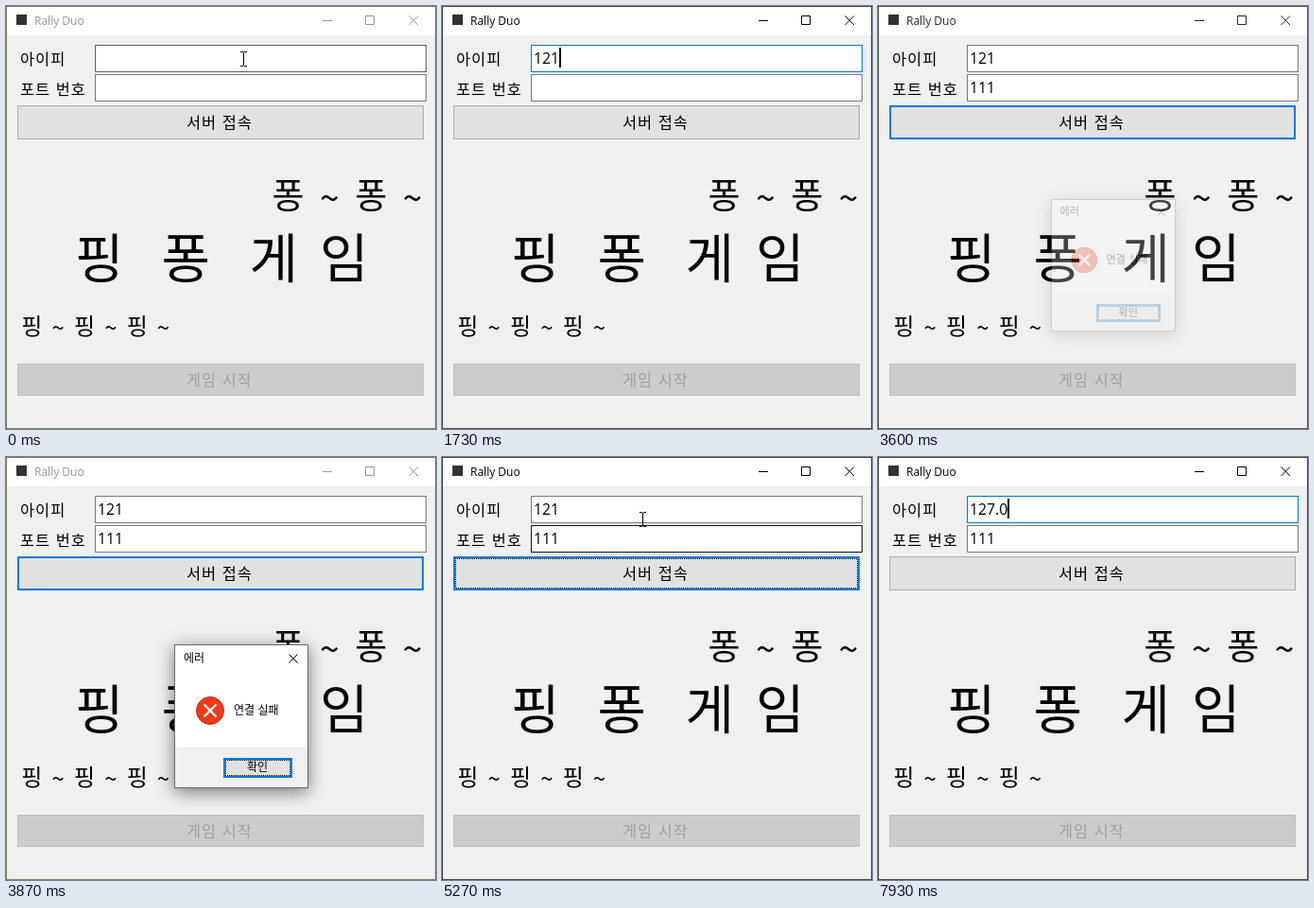
An HTML page that plays this animation: 455 px wide and 447 px high, repeating every 8 s.

```html
<!DOCTYPE html>
<html lang="ko">
<head>
<meta charset="utf-8">
<style>
html, body { margin: 0; width: 100%; height: 100%; overflow: hidden; background: #f0f0f0 }
svg { display: block }
text { font-family: "Noto Sans CJK KR", "Noto Sans CJK", sans-serif; font-weight: 350; white-space: pre }
tspan { baseline-shift: -.08em }
rect { shape-rendering: crispEdges }
.latin { font-family: "Open Sans", "Noto Sans", sans-serif; font-weight: 400 }
.label { font-size: 16.4px; letter-spacing: 1px }
.input { font-size: 15.8px }
.small { font-size: 12px }
.box { fill: #fff }
.blue { fill: none; stroke: #0078d7; stroke-width: 2 }
.dots { fill: none; stroke: #000; stroke-dasharray: 1; stroke-dashoffset: .5 }
.line { fill: none; stroke: #000 }
#dialog { transform-origin: 249px 274px; filter: drop-shadow(0 4px 9px rgba(0, 0, 0, .5)) }
</style>
</head>
<body>
<svg width="455" height="447" viewBox="0 0 455 447">
  <rect width="455" height="447" fill="#f0f0f0"/>
  <rect width="455" height="31" fill="#fff"/>
  <rect id="frame" x=".5" y=".5" width="454" height="446" fill="none"/>
  <rect x="11" y="9" width="11" height="11" fill="#333"/>
  <text id="title" class="latin small" x="30" y="20">Rally Duo</text>
  <path id="controls" class="line" d="M335 15.5h10M380.5 10.5h9v9h-9zM426.5 10.5l9.5 9.5M436 10.5l-9.5 9.5"/>

  <text class="label" x="15" y="62">아이피</text>
  <text class="label" x="15" y="94">포트 번호</text>
  <rect id="ipBox" class="box" x="94.5" y="41.5" width="350" height="28"/>
  <rect id="portBox" class="box" x="94.5" y="72.5" width="350" height="28"/>
  <text id="ip" class="latin input" x="97" y="61"></text>
  <text id="port" class="latin input" x="97" y="92"></text>
  <rect id="caret" height="21"/>

  <rect id="button" x="12.5" y="105.5" width="429" height="35" stroke="#adadad"/>
  <rect id="focus" class="blue" x="13" y="106" width="428" height="34"/>
  <rect id="dots" class="dots" x="14.5" y="107.5" width="425" height="31"/>
  <text class="label" x="191" y="129">서버 접속</text>

  <text font-size="37" letter-spacing="3.1" x="281.5" y="213.5">퐁 <tspan>~</tspan> 퐁 <tspan>~</tspan></text>
  <text font-size="56" x="73 164.5 257.5 332" y="287">핑퐁게임</text>
  <text font-size="24" letter-spacing="1.7" x="16.3" y="347">핑 <tspan>~</tspan> 핑 <tspan>~</tspan> 핑 <tspan>~</tspan></text>

  <rect x="12.5" y="378.5" width="429" height="33" fill="#ccc" stroke="#bfbfbf"/>
  <text class="label" x="191" y="401" fill="#a0a0a0">게임 시작</text>

  <g id="dialog">
    <rect x="178.5" y="198.5" width="141" height="151" fill="#fff" stroke="#6b6b6b"/>
    <rect x="179" y="307" width="140" height="42" fill="#f0f0f0"/>
    <text class="small" x="188" y="217">에러</text>
    <path class="line" d="M299.5 208.5l9 9M308.5 208.5l-9 9"/>
    <circle cx="216" cy="268" r="14.5" fill="#f03a17" stroke="#b92b10"/>
    <path d="M209.5 261.5l13 13M222.5 261.5l-13 13" stroke="#fff" stroke-width="2.4"/>
    <text class="small" x="241" y="272">연결 실패</text>
    <rect x="230" y="318" width="73" height="21" fill="#e1e1e1"/>
    <rect class="blue" x="231" y="319" width="71" height="19"/>
    <rect class="dots" x="232.5" y="320.5" width="68" height="16"/>
    <text class="small" x="255" y="332">확인</text>
  </g>

  <path id="beam" class="line" shape-rendering="crispEdges" d="M-3-7.5h3M1-7.5h3M.5-7v14M-3 7.5h3M1 7.5h3"/>
  <path id="arrow" fill="#fff" stroke="#000" d="M.5.5v16l3.7-3.5 2.6 5.8 2.5-1.1-2.6-5.7h5.3z"/>
</svg>
<script>
const LOOP = 8000, STEP = 200 / 3, BLINK = 530;
const el = id => document.getElementById(id);
const show = (id, on) => el(id).style.display = on ? '' : 'none';
const set = (id, attrs) => Object.entries(attrs).forEach(a => el(id).setAttribute(...a));
const ramp = (t, from, time = 270) => Math.min(1, Math.max(0, (t - from) / time));
const pulse = (t, on, off, time) => ramp(t, on, time) - ramp(t, off, time);
const mix = (a, b, k) => a.map((v, i) => Math.round(v + (b[i] - v) * k));

const GREY = [122, 122, 122], DARK = [23, 23, 23], BLUE = [0, 120, 215];

// A control's name moves the focus there, '<' erases, anything else is typed.
const inputs = [
  [670, 'ip'], [1270, '1'], [1470, '2'], [1730, '1'],
  [2270, 'port'], [2670, '1'], [2870, '1'], [3000, '1'],
  [3200, 'button'],
  [5530, 'ip'], [6270, '<'], [6670, '7'], [7000, '.'], [7930, '0']];

function replay(t) {
  const state = { ip: '', port: '', button: '', focus: 'button', last: 0 };
  for (const [time, key] of inputs) {
    if (time > t) break;
    const field = state.focus;
    if (key in state) state.focus = key;
    else state[field] = key === '<' ? state[field].slice(0, -1) : state[field] + key;
    state.last = time;
  }
  return state;
}

function drawText(t) {
  const { ip, port, focus, last } = replay(t);
  el('ip').textContent = ip;
  el('port').textContent = port;
  show('caret', focus !== 'button' && (t - last) % (2 * BLINK) < BLINK);
  set('caret', {
    x: 97 + Math.round(el(focus).getComputedTextLength?.() ?? 0),
    y: focus === 'ip' ? 44 : 75,
    width: focus === 'ip' ? 2 : 1
  });
}

function drawBorder(id, hover, focus) {
  el(id).style.stroke = `rgb(${mix(mix(GREY, DARK, hover), BLUE, focus)})`;
}

// The pointer drifts down, hides while typing, then dips to the button and returns.
function drawPointer(t) {
  const first = t < 530, k = ramp(t, 0, 200), shown = first || t >= 4870 && t < 6670;
  const x = first ? 251 - 6 * k : 236 - 24 * ramp(t, 4870, 400);
  const y = first ? 56 + 9 * k : 66 + 44 * pulse(t, 4800, 5130, 130) - 9 * ramp(t, 5270, 130);
  for (const [id, on] of [['beam', y < 105], ['arrow', y >= 105]]) {
    show(id, shown && on);
    set(id, { transform: `translate(${Math.round(x)} ${Math.round(y)})` });
  }
}

function draw(t) {
  const active = pulse(t, 330, 3530) + ramp(t, 4130);
  el('title').style.fill = el('controls').style.stroke = `rgb(${mix([153, 153, 153], [0, 0, 0], active)})`;
  el('frame').style.stroke = `rgb(${mix([133, 127, 104], [74, 76, 58], active)})`;

  drawBorder('ipBox', pulse(t, -70, 530), pulse(t, 330, 2200) + ramp(t, 5270));
  drawBorder('portBox', pulse(t, 5000, 5670), pulse(t, 2200, 3130));
  drawText(t);

  el('button').style.fill = `rgb(${mix([225, 225, 225], [229, 241, 251], pulse(t, 4800, 5070, 130))})`;
  el('focus').style.opacity = pulse(t, 3130, 5270);
  show('dots', t >= 3200 && t < 3530 || t >= 4270 && t < 5400);

  const open = pulse(t, 3530, 4130);
  show('dialog', open > 0);
  el('dialog').style.opacity = open;
  el('dialog').style.transform = `scale(${.9 + .1 * open})`;

  drawPointer(t);
}

// The picture advances 15 times a second.
const start = performance.now();
function tick() {
  const t = (performance.now() - start) % LOOP;
  draw(Math.round(Math.floor((t + 3.4) / STEP) * STEP / 10) * 10 % LOOP);
  requestAnimationFrame(tick);
}
tick();
</script>
</body>
</html>
```
